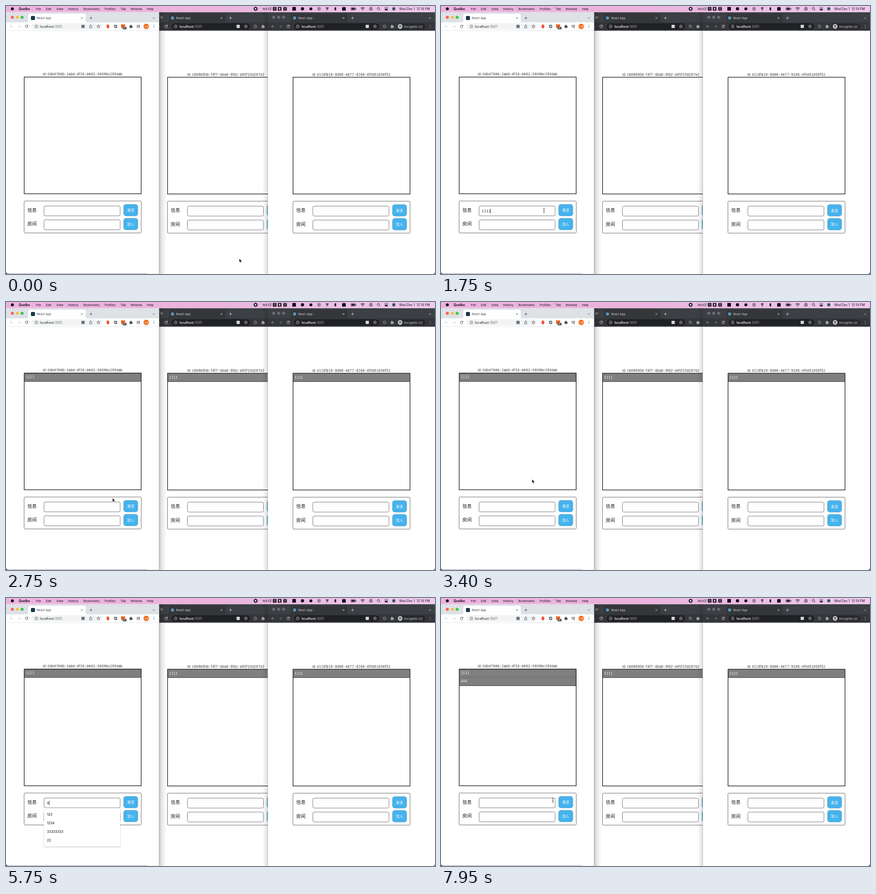
An HTML page for the animation above (8 s loop, 947x591 px).

```html
<!DOCTYPE html>
<html lang="en">
<head>
<meta charset="utf-8">
<title>Chat room demo</title>
<style>
html, body { margin: 0; width: 100%; height: 100%; overflow: hidden; background: #fff; }
svg { display: block; width: 947px; height: 591px; }
text { font-family: Inter, "Noto Sans CJK SC", "Noto Sans CJK", sans-serif; white-space: pre; }
.tab { font-variant-numeric: tabular-nums; }
</style>
</head>
<body>
<svg id="stage" viewBox="0 0 947 591" xmlns="http://www.w3.org/2000/svg"></svg>
<script>
const LOOP = 8000;
const stage = document.getElementById('stage');

// ---- drawing helpers (all return markup) ----
const rect = (x, y, w, h, fill, rx = 0, extra = '') =>
  `<rect x="${x}" y="${y}" width="${w}" height="${h}" rx="${rx}" fill="${fill}" ${extra}/>`;
const dot = (x, y, r, fill, extra = '') => `<circle cx="${x}" cy="${y}" r="${r}" fill="${fill}" ${extra}/>`;
const line = (d, color, w = 0.9, extra = '') =>
  `<path d="${d}" fill="none" stroke="${color}" stroke-width="${w}" ${extra}/>`;
const text = (x, y, str, size, fill, extra = '') =>
  `<text x="${x}" y="${y}" font-size="${size}" fill="${fill}" ${extra}>${str}</text>`;
const ring = (x, y, r, color, w = 0.9) => dot(x, y, r, 'none', `stroke="${color}" stroke-width="${w}"`);

// ---- icons ----
const icon = {
  cross: (x, y, c) => line(`M${x - 1.8} ${y - 1.8}l3.6 3.6m0-3.6l-3.6 3.6`, c),
  plus: (x, y, c) => line(`M${x - 3} ${y}h6m-3-3v6`, c),
  chevron: (x, y, c) => line(`M${x - 2.3} ${y - 1}l2.3 2.2l2.3-2.2`, c),
  back: (x, y, c) => line(`M${x + 3} ${y}h-6m2.8-2.8l-2.8 2.8l2.8 2.8`, c),
  forward: (x, y, c) => line(`M${x - 3} ${y}h6m-2.8-2.8l2.8 2.8l-2.8 2.8`, c),
  reload: (x, y, c) => line(`M${x + 2.4} ${y - 1.8}a3 3 0 1 0 .5 2.6`, c, 1) +
    `<path d="M${x + 3.2} ${y - 3.4}v3.2h-3.2z" fill="${c}"/>`,
  info: (x, y, c) => ring(x, y, 3.2, c, 0.8) + line(`M${x} ${y - 0.4}v2m0-3.6v.9`, c, 0.8),
  star: (x, y, c) => {
    let d = '';
    for (let i = 0; i < 10; i++) {
      const r = i % 2 ? 1.6 : 3.8, a = i * Math.PI / 5;
      d += `${i ? 'L' : 'M'}${(x + r * Math.sin(a)).toFixed(2)} ${(y - r * Math.cos(a)).toFixed(2)}`;
    }
    return line(d + 'z', c, 0.8);
  },
  translate: (x, y, c) => rect(x - 3.6, y - 3.6, 7.2, 7.2, c, 0.8),
  share: (x, y, c) => line(`M${x - 1.2} ${y - 1}h-1.3v4.5h5v-4.5h-1.3M${x} ${y + 1}v-4.8m-1.6 1.6l1.6-1.6l1.6 1.6`, c, 0.8),
  blocked: (x, y, c) => ring(x, y, 2.9, c, 1.1) + line(`M${x - 3.2} ${y - 3.2}l6.4 6.4`, c, 1),
  puzzle: (x, y, c) => rect(x - 3.2, y - 2, 5.6, 5.6, c, 0.7) + dot(x - 0.4, y - 2.2, 1.4, c) + dot(x + 2.5, y + 0.8, 1.4, c),
  list: (x, y, c) => line(`M${x - 3.8} ${y - 2.5}h6m-6 2.2h6m-6 2.2h3.6M${x + 2.4} ${y + 2.6}v-5h1.8`, c, 0.9) + dot(x + 1.6, y + 2.6, 1.1, c),
  menu: (x, y, c) => [-2.7, 0, 2.7].map(d => dot(x, y + d, 0.8, c)).join('')
};

function menuBar() {
  const k = '#15101a', items = [['File', 66], ['Edit', 88], ['View', 111], ['History', 137], ['Bookmarks', 171],
    ['Profiles', 218], ['Tab', 253], ['Window', 275], ['Help', 311]];
  return rect(0, 0, 947, 13.5, 'url(#bar)') + dot(14, 6.2, 3.3, k) +
    text(28, 8.7, 'Quelbo', 7.1, k, 'font-weight="700"') +
    items.map(([s, x]) => text(x, 8.7, s, 6.75, k)).join('') +
    dot(551, 6.2, 4.2, k) + rect(549.3, 4.5, 3.4, 3.4, '#eee', 0.8) +
    text(566, 8.7, '1603字', 6.4, k) +
    [593, 604, 616].map(x => rect(x - 4, 2.2, 8, 8, k, 1)).join('') +
    ring(593, 6.2, 2, '#e9c0e4', 0.8) + rect(602.5, 4, 3, 4.4, '#e9c0e4') +
    line('M612.8 4.2h6.4m-6.4 3.8h6.4m-3.2-4v4.5', '#e9c0e4', 0.7) +
    rect(632, 2.2, 8, 8, k) + dot(654.5, 6.2, 3.6, k) + dot(673, 6.2, 3.3, k) +
    ring(691, 6.2, 3.3, k, 0.8) + `<path d="M690 4.6l2.7 1.6l-2.7 1.6z" fill="${k}"/>` +
    dot(707.6, 4.2, 1.3, k) + dot(710.6, 4.2, 1.3, k) + line('M708.2 4.2v5.6m1.8-5.6v5.6', k, 0.8) +
    rect(725.2, 3, 3.6, 6.6, k, 1) + rect(742, 2.4, 8, 7.8, k, 1) +
    rect(761.3, 3.2, 10, 6, 'none', 1.4, `stroke="${k}" stroke-width=".7"`) + rect(762.6, 4.5, 7.4, 3.4, k, 0.5) + rect(772, 5, 1, 2.4, k) +
    line('M783 5a6 6 0 0 1 8.6 0M784.7 6.9a3.6 3.6 0 0 1 5.2 0', k, 1.1) + dot(787.3, 8.7, 1, k) +
    ring(805.5, 6.2, 3.4, k, 0.8) + dot(805.5, 5.1, 1.2, k) + line('M803.4 8.3q2.1-2 4.2 0', k, 1) +
    ring(822, 5.6, 2.5, k) + line('M823.8 7.4l2 2', k) +
    rect(836, 3, 6.8, 2.7, 'none', 1.3, `stroke="${k}" stroke-width=".7"`) + rect(836, 6.8, 6.8, 2.8, k, 1.4) +
    dot(856, 6.2, 3.6, '#3e5578') +
    text(868, 8.7, 'Wed Dec 1  12:14 PM', 6.95, k);
}

// Address and tab furniture of a dark window; dx shifts the left part, rx the right one.
function darkTop(x, w, dx, rx) {
  const c = '#d5d7da', dim = '#7d8085';
  return rect(x, 13.5, w, 23, '#3c3f43') + rect(x, 36, w, 18.5, '#35363a') +
    `<path d="M${625 + dx} 36.5q4 0 4-4v-11.5q0-4 4-4h117q4 0 4 4v11.5q0 4 4 4z" fill="#35363a"/>` +
    [591, 602, 613].map(p => dot(p + dx, 25, 3.3, '#696c70')).join('') +
    dot(637 + dx, 26.5, 3.4, '#4a9fbb') + text(645 + dx, 28.9, 'React App', 6.5, c) +
    icon.cross(745 + dx, 26.5, c) + icon.plus(765 + dx, 26.5, c) +
    icon.back(589 + dx, 45, '#a0a3a7') + icon.forward(606 + dx, 45, dim) + icon.reload(623 + dx, 45, c) +
    rect(635 + dx, 38, 189 + rx - dx, 14, '#202124', 7) + icon.info(644 + dx, 45, c) +
    text(652.5 + dx, 47.6, '<tspan fill="#fff" font-weight="500">localhost</tspan>:3001', 7.2, '#a9acb0') +
    icon.translate(797.5 + rx, 45, c) + icon.star(814.5 + rx, 45, c) +
    icon.blocked(835.5 + rx, 45, dim) + icon.puzzle(852.5 + rx, 45, '#a5a8ac');
}

function lightTop() {
  const c = '#4b4f54', dim = '#c4c7ca';
  return rect(0, 13.5, 338, 23, '#dee1e6', 0) +
    '<path d="M45 36.5q4 0 4-4v-11.5q0-4 4-4h119q4 0 4 4v11.5q0 4 4 4z" fill="#fff"/>' +
    dot(14, 25, 3.3, '#f9605a') + dot(25, 25, 3.3, '#fbbd3f') + dot(35.6, 25, 3.3, '#34c84a') +
    rect(55, 22, 9, 9, '#1d3645', 2) + text(68, 28.9, 'React App', 6.5, '#3c4043') +
    icon.cross(167.5, 26.5, c) + icon.plus(187.5, 26.5, c) + icon.chevron(326, 26.5, c) +
    rect(0, 36, 338, 18, '#fff') + rect(0, 54, 338, 0.7, '#dcdee0') +
    icon.back(12, 45, dim) + icon.forward(29, 45, dim) + icon.reload(45.5, 45, c) +
    rect(56, 38, 156, 14, '#f1f3f4', 7) + icon.info(67, 45, c) +
    text(75, 47.6, '<tspan fill="#202124">localhost</tspan>:3001', 7.2, '#6a6e73') +
    icon.translate(170, 45, '#70747a') + icon.share(187, 45, c) + icon.star(204, 45, c) +
    rect(222.2, 41, 5.6, 8, '#ea5a36', 1.4) + icon.blocked(242, 45, '#333') +
    rect(254, 40.5, 9, 8, '#f26322', 0.8) + rect(257.5, 46, 8.5, 5.4, '#4d4d4d', 1) + text(258.4, 50.3, 'off', 4, '#fff') +
    icon.puzzle(276, 45, c) + icon.list(292, 45, c) +
    dot(309.5, 45, 6, '#f46a1b') + text(309.5, 46.8, '头像', 4.4, '#ffe3d0', 'text-anchor="middle"') +
    icon.menu(326.5, 45, c);
}

const SEND = { x: 259.7, y: 437.5 }, JOIN = { x: 259.7, y: 468.2 };
const BTN_W = 31.3, BTN_H = 25.4;
const INPUT = { x: 84, y: 441, w: 168, h: 21.8 };

function button({ x, y }, label, hover = false, pressed = false) {
  const cx = x + BTN_W / 2, cy = y + BTN_H / 2, s = pressed ? 0.9 : 1;
  return `<g transform="translate(${cx} ${cy}) scale(${s})">` +
    rect(-BTN_W / 2, -BTN_H / 2, BTN_W, BTN_H, hover ? '#1580b8' : '#45b3ed', 5, `stroke="${hover ? '#17658d' : '#4d92b5'}" stroke-width=".7"`) +
    text(0, 2.9, label, 7.9, '#fff', 'text-anchor="middle"') + '</g>';
}

const message = (str, row) => rect(40.7, 157 + row * 18.1, 257.5, 18, '#807f80') +
  rect(40.7, 174.8 + row * 18.1, 257.5, 0.9, '#222') +
  text(43.7, 168.3 + row * 18.1, str, 7.2, '#fff', 'class="tab"');

const field = y => rect(INPUT.x, y, INPUT.w, INPUT.h, '#fff', 3, 'stroke="#666" stroke-width=".9"');

// Chat page laid out for the left window; other windows shift it.
function page(id, messages, ui = {}) {
  return text(169, 153.2, 'id: ' + id, 7.35, '#333', 'class="tab" text-anchor="middle"') +
    messages.map(message).join('') +
    rect(40.2, 156.7, 258.2, 257.4, 'none', 0, 'stroke="#111" stroke-width="1.3"') +
    rect(40, 430, 258.5, 70.5, 'none', 2, 'stroke="#555" stroke-width=".9"') +
    text(47.3, 453.8, '信息', 10.2, '#111', 'font-weight="500"') + text(47.3, 484.3, '房间', 10.2, '#111', 'font-weight="500"') +
    field(INPUT.y) + field(471.6) +
    button(SEND, '发送', ui.over === 'send', ui.pressed) + button(JOIN, '加入', ui.over === 'join');
}

const HINTS = ['123', '1234', '33333333', '22'];
function dropdown(count) {
  if (!count) return '';
  return rect(INPUT.x, 463.3, INPUT.w, 8.4 + count * 19.1, '#fff', 2, 'filter="url(#soft)"') +
    HINTS.slice(0, count).map((s, i) => text(90.5, 479.8 + i * 19, s, 7.1, '#222', 'font-weight="500"')).join('');
}

const CURSORS = {
  arrow: '<path d="M0 0v8.2l1.9-1.7l1.3 2.9l1.4-.6l-1.3-2.8h2.5z" fill="#000" stroke="#fff" stroke-width=".6"/>',
  text: line('M-1.6-4.6q1.6 0 1.6 1.2v6.8q0 1.2-1.6 1.2M1.6-4.6q-1.6 0-1.6 1.2M0 3.4q0 1.2 1.6 1.2M-1 .9h2', '#333', 0.9),
  hand: '<path d="M-.9.6q.9-1.2 1.7 0v3q3.6-.2 5 1.4q.5 2.6-1 4.6h-4.6q-1.2-2.2-3.2-4q.6-1.4 2.1-.1z" fill="#111" stroke="#fff" stroke-width=".7"/>'
};

// ---- timeline ----
// Pointer stops: time, x, y
const PATH = [
  [50, 515, 557], [400, 185, 454], [1650, 185, 454], [1870, 281.5, 446.5],
  [2350, 281.5, 446.5], [3150, 189, 418], [3400, 201, 391], [4350, 201, 391],
  [4600, 288, 463.5], [4800, 288, 463.5], [4880, 254, 464], [5000, 187, 454],
  [6100, 187, 454], [6500, 270, 449], [7550, 270, 449], [7940, 247, 446]
];
const TYPED = [[0, ''], [1300, '1'], [1440, '11'], [1550, '111'], [1640, '1111'], [2000, ''],
  [5750, '4'], [5850, '44'], [5980, '444'], [6650, '']];
const HINT_COUNT = [[0, 0], [700, 4], [1390, 2], [1440, 0], [5150, 4], [5850, 0]];
const CARET = [[650, 1050], [1300, 1900], [4950, 5450], [5750, 6400]];
const HIDDEN = [[1390, 1650], [5700, 6100]];
const PRESSED = [[1900, 2000], [6550, 6650]];

const within = (spans, t) => spans.some(([a, b]) => t >= a && t < b);
const latest = (steps, t) => steps.filter(([at]) => t >= at).pop()[1];

function pointer(t) {
  const i = PATH.findIndex(p => p[0] > t);
  if (i === 0) return PATH[0].slice(1);
  if (i < 0) return PATH[PATH.length - 1].slice(1);
  const [t0, x0, y0] = PATH[i - 1], [t1, x1, y1] = PATH[i];
  const u = (t - t0) / (t1 - t0), e = u * u * (3 - 2 * u);
  return [x0 + (x1 - x0) * e, y0 + (y1 - y0) * e];
}

function hit(x, y) {
  const inside = (b, w, h) => x >= b.x && x <= b.x + w && y >= b.y && y <= b.y + h;
  if (inside(SEND, BTN_W, BTN_H)) return 'send';
  if (inside(JOIN, BTN_W, BTN_H)) return 'join';
  if (inside(INPUT, INPUT.w, INPUT.h) || inside({ x: INPUT.x, y: 471.6 }, INPUT.w, INPUT.h)) return 'input';
  return '';
}

// ---- scene ----
stage.innerHTML = `<defs>
  <linearGradient id="bar"><stop offset="0" stop-color="#edb3df"/><stop offset=".45" stop-color="#e9b3de"/><stop offset="1" stop-color="#f0c9ee"/></linearGradient>
  <linearGradient id="shadeL"><stop offset="0" stop-opacity=".24"/><stop offset=".35" stop-opacity=".09"/><stop offset="1" stop-opacity="0"/></linearGradient>
  <linearGradient id="shadeR"><stop offset="0" stop-opacity="0"/><stop offset="1" stop-opacity=".13"/></linearGradient>
  <clipPath id="midClip"><rect x="338" y="13" width="240" height="578"/></clipPath>
  <clipPath id="leftClip"><path d="M0 13h338v572.5q0 5-5 5h-328q-5 0-5-5z"/></clipPath>
  <filter id="soft" x="-5%" y="-5%" width="110%" height="115%"><feDropShadow dx="0" dy=".8" stdDeviation=".9" flood-opacity=".3"/></filter>
</defs>
${rect(0, 13, 947, 578, '#fff')}${rect(0, 580, 312, 11, '#2b2050')}${rect(312, 580, 26, 11, '#d6d6d8')}
<g clip-path="url(#midClip)">${darkTop(308, 354, -269.5, -285)}<g id="mid" transform="translate(316.4 .4)"></g>
${rect(338, 13.5, 17, 577.5, 'url(#shadeL)')}${rect(566, 13.5, 12, 577.5, 'url(#shadeR)')}</g>
${rect(578, 54, 369, 537, '#fff')}${darkTop(578, 369, 0, 0)}
${rect(863, 38.5, 63, 13, '#27282b', 6.5)}${dot(870, 45, 5.2, '#d5d7da')}${rect(867.4, 42.6, 5.2, 1.8, '#35363a', 0.7)}
${ring(868.3, 46.6, 1.1, '#35363a', 0.7)}${ring(871.7, 46.6, 1.1, '#35363a', 0.7)}
${text(879, 47.5, 'Incognito (2)', 6.75, '#d5d7da')}${icon.menu(936.5, 45, '#a5a8ac')}${icon.chevron(936, 26.5, '#d5d7da')}
<g id="right" transform="translate(593.4 .4)"></g>${rect(577.5, 54, 0.7, 537, '#aaa')}
<path d="M947 586v5h-5q5 0 5-5z" fill="#2b2050"/>
<g clip-path="url(#leftClip)">${rect(0, 13, 338, 578, '#fff')}${lightTop()}<g id="left"></g></g>
${rect(337.7, 15, 0.7, 572, '#999')}
${menuBar()}<g id="top"></g>`;

const layer = Object.fromEntries(['left', 'mid', 'right', 'top'].map(id => [id, document.getElementById(id)]));
const drawn = {};
function put(name, markup) {
  if (drawn[name] !== markup) layer[name].innerHTML = drawn[name] = markup;
}

function render(t) {
  const [x, y] = pointer(t), over = hit(x, y);
  const visible = !within(HIDDEN, t);
  const shared = t >= 2000 ? ['1111'] : [];
  const own = t >= 6650 ? ['1111', '444'] : shared;
  const typed = latest(TYPED, t);
  const ui = { over: visible ? over : '', pressed: within(PRESSED, t) };

  put('left', page('04b4768b-2abd-4f18-b662-5809bc295dab', own, ui) +
    text(90, 454.6, typed, 7.6, '#222', 'class="tab"') +
    (within(CARET, t) ? rect(90.2 + typed.length * 4.75, 447, 0.8, 10, '#222') : '') +
    dropdown(latest(HINT_COUNT, t)));
  put('mid', page('c889690b-f4f7-4ba8-9fd2-e85f10d297e2', shared));
  put('right', page('e118fa18-8d98-4e77-8166-ef0d52e56f52', shared));
  const kind = over === 'input' ? 'text' : over ? 'hand' : 'arrow';
  put('top', visible ? `<g transform="translate(${x.toFixed(2)} ${y.toFixed(2)})">${CURSORS[kind]}</g>` : '');
}

function tick() {
  render(performance.now() % LOOP);
  requestAnimationFrame(tick);
}
tick();
</script>
</body>
</html>
```
